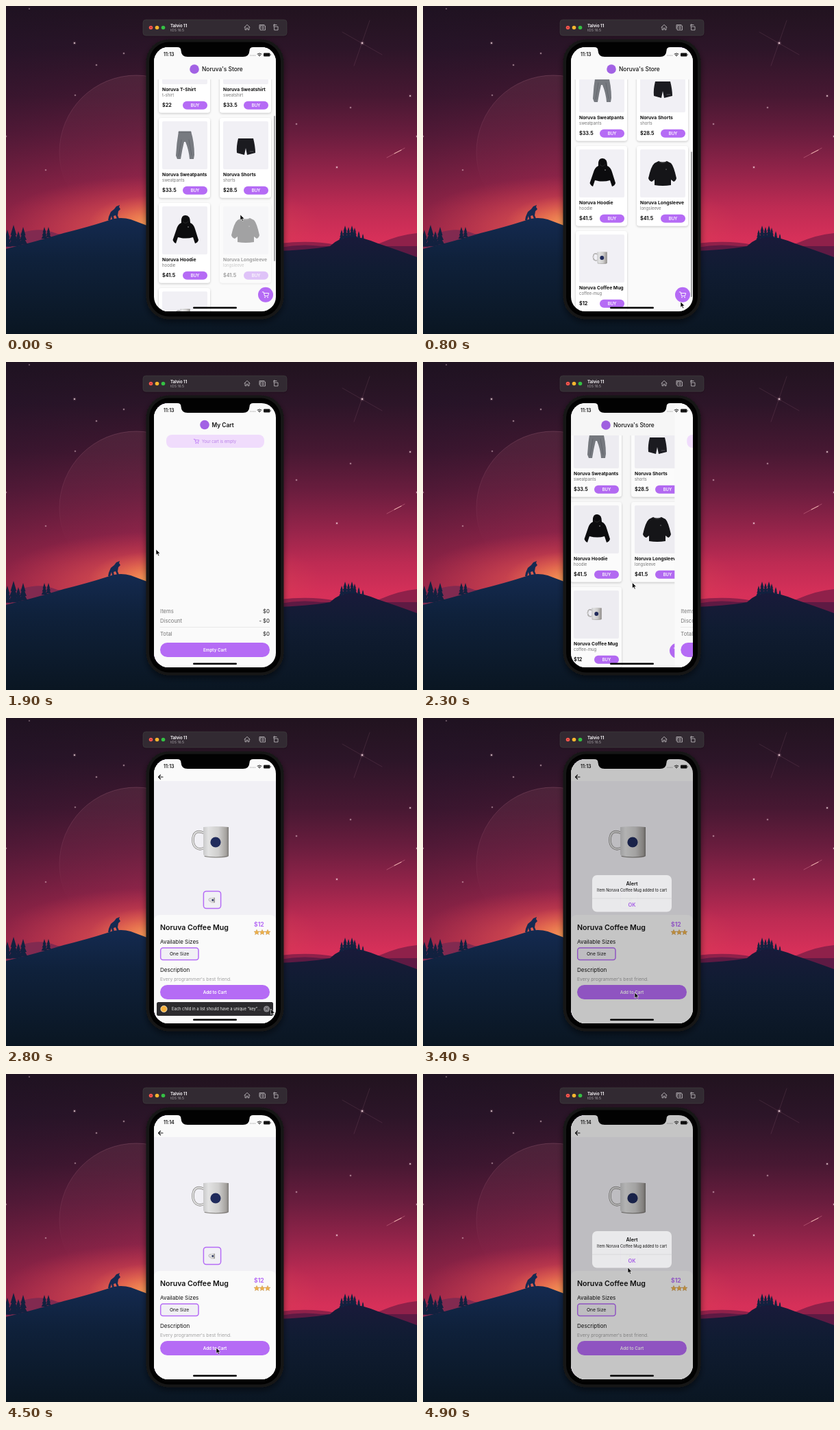
Recreate the animation shown at these times as an HTML page. Size 600 px wide and 478 px high, loop 5000 ms.

```html
<!DOCTYPE html>
<html lang="en">
<head>
<meta charset="utf-8">
<title>Store demo</title>
<style>
html, body { margin: 0; width: 100%; height: 100%; overflow: hidden; background: #0b1622; }
svg { display: block; width: 100vw; height: 100vh; font-family: Inter, sans-serif; }
</style>
</head>
<body>
<svg id="stage" viewBox="0 0 600 478"></svg>
<script>
const PURPLE = '#b56bf5', BRAND = 'Noruva', W = 178;

// ---- markup helpers ----
const text = (x, y, size, str, fill = '#111', weight = 400, anchor = 'start') =>
  `<text x="${x}" y="${y}" font-size="${size}" fill="${fill}" font-weight="${weight}" text-anchor="${anchor}">${str}</text>`;
const rect = (x, y, w, h, r, fill, more = '') =>
  `<rect x="${x}" y="${y}" width="${w}" height="${h}" rx="${r}" fill="${fill}" ${more}/>`;
const dot = (x, y, r, fill, more = '') => `<circle cx="${x}" cy="${y}" r="${r}" fill="${fill}" ${more}/>`;
const path = (d, fill, more = '') => `<path d="${d}" fill="${fill}" ${more}/>`;
const line = (d, color, width = 1, more = '') =>
  path(d, 'none', `stroke="${color}" stroke-width="${width}" stroke-linecap="round" stroke-linejoin="round" ${more}`);
const group = (id, body, more = '') => `<g id="${id}" ${more}>${body}</g>`;
const at = (x, y, body, scale = 1) => `<g transform="translate(${x} ${y}) scale(${scale})">${body}</g>`;
const stopList = stops => stops.map(([o, c, a = 1]) => `<stop offset="${o}" stop-color="${c}" stop-opacity="${a}"/>`).join('');
const gradient = (id, stops, more = 'x2="0" y2="1"') => `<linearGradient id="${id}" ${more}>${stopList(stops)}</linearGradient>`;
const radial = (id, stops) => `<radialGradient id="${id}">${stopList(stops)}</radialGradient>`;
const button = (y, label) => rect(225, y, 160, 21, 10.5, PURPLE) + text(305, y + 12.8, 6.3, label, '#fff', 600, 'middle');

// ---- scenery ----
const fir = (x, y, h) => {
  const w = h * .22;
  return path([0, .25, .5].map(k =>
    `M${x} ${y - h * (1 - k)}l${w * (.6 + k)} ${h * .45}h${-2 * w * (.6 + k)}z`).join(''), '#12213f');
};
const star = (x, y, r = .8) => dot(x, y, r * 2.2, '#f6c6d8', 'opacity=".15"') + dot(x, y, r, '#f8dfe4', 'opacity=".85"');

const defs = `<defs>
${gradient('sky', [[0, '#21131f'], [.16, '#2c1528'], [.35, '#471832'], [.5, '#6a1d3e'], [.65, '#95244a'], [.78, '#bd2b53'], [.9, '#d63059'], [1, '#d8325a']], 'x2="0" y2="375" gradientUnits="userSpaceOnUse"')}
${gradient('dark', [[0, '#1a1026', .32], [1, '#1a1026', 0]], '')}
${gradient('moon', [[0, '#8a4a60', .25], [.4, '#963c5c', .14], [.8, '#963c5c', 0]])}
${gradient('rim', [[0, '#c98298', .3], [.5, '#c98298', .12], [.7, '#c98298', 0]])}
${gradient('hillL', [[0, '#142a50'], [.35, '#0f213b'], [1, '#0a1622']])}
${gradient('hillR', [[0, '#191a3a'], [.35, '#101c32'], [1, '#0a1622']])}
${gradient('mugBody', [[0, '#c9c9ca'], [.2, '#e2e2e2'], [.6, '#cfcecd'], [.9, '#a5a29f'], [1, '#7d7a77']], '')}
${radial('haze', [[0, '#f0704e', .8], [.5, '#e4584f', .45], [1, '#d8404f', 0]])}
${radial('glow', [[0, '#ffb45c', .85], [.5, '#f9924e', .45], [1, '#f0704e', 0]])}
<filter id="soft" x="-30%" y="-30%" width="160%" height="160%"><feDropShadow dx="0" dy="1.2" stdDeviation="1.6" flood-opacity=".22"/></filter>
<filter id="deep" x="-30%" y="-30%" width="160%" height="160%"><feDropShadow dx="0" dy="4" stdDeviation="5" flood-opacity=".5"/></filter>
<clipPath id="screen"><rect x="216" y="60" width="${W}" height="385" rx="21"/></clipPath>
</defs>`;

const scenery = rect(0, 0, 600, 478, 0, 'url(#sky)') + rect(0, 0, 300, 375, 0, 'url(#dark)') +
  dot(190, 213, 112, 'url(#moon)', 'stroke="url(#rim)" stroke-width=".8"') +
  '<ellipse cx="225" cy="322" rx="240" ry="75" fill="url(#haze)"/><ellipse cx="215" cy="318" rx="95" ry="42" fill="url(#glow)"/>' +
  [[100, 54, 1.1], [132, 86], [172, 69], [101, 130, .7], [503, 148], [590, 131, 1], [424, 172], [483, 235, 1],
   [58, 239, .7], [34, 4, .6], [0, 190], [600, 190, 1], [520, 54, 1.3]].map(s => star(...s)).join('') +
  line('M491 38l58 33M531 21l-23 66', '#e8a0b8', .5, 'opacity=".25"') +
  line('M556 221l26 -14', '#e58aa0', .7, 'opacity=".6"') + line('M567 215l10 -5', '#ffc9c0', .9) +
  path('M0 337Q20 330 38 327T75 332L110 335V380H0z', '#812a50') +
  path('M400 346Q425 343 448 344T490 350L545 346Q575 333 600 331V390H400z', '#8f214a') +
  path('M400 352Q430 346 460 350L600 350V400H400z', '#5e1a43') +
  path('M0 354Q45 343 84 331Q120 322 148 313Q165 306 182 311L206 320L300 350V478H0z', 'url(#hillL)') +
  path('M300 350L390 357Q440 356 473 350Q486 337 505 336Q522 337 543 346Q570 355 600 366V478H300z', 'url(#hillR)') +
  [[2, 352, 26], [11, 352, 33], [18, 350, 22], [25, 349, 27], [56, 340, 18], [62, 338, 16]].map(f => fir(...f)).join('') +
  [[490, 341, 15], [495, 339, 19], [500, 338, 16], [505, 338, 18], [509, 338, 15], [515, 340, 12], [521, 341, 9]].map(f => fir(...f)).join('') +
  path('M149 312l1-5 3-7 5-4 3-4 5-2-1 3 2 3-3 3-1 6 2 5h-3l-2-5-3 1 1 5h-3l-1-5-2 6z', '#152a52');

const light = (x, c) => dot(x, 31.5, 2.8, c);
const titleBar = rect(200, 20, 210, 23, 4, '#302c30', 'filter="url(#soft)" stroke="#464046" stroke-width=".5"') +
  light(211.5, '#f4564e') + light(220.5, '#f6b62f') + light(229.5, '#35c144') +
  dot(211.5, 31.5, .7, '#8d1d18') +
  text(240, 30.7, 6, 'Talvio 11', '#f4f1f4', 700) + text(240, 37.3, 5.2, 'tOS 16.5', '#aaa5aa') +
  line('M348 31l4-3.7 4 3.7M349 30.5v4.2h2v-2.5h2v2.5h2v-4.2', '#c5c0c5', .8) +
  line('M370 33v-5.5h7M371.5 29h7v6h-7z', '#c5c0c5', .8) + dot(375, 32, 1.4, 'none', 'stroke="#c5c0c5" stroke-width=".7"') +
  line('M392 30h5v5h-5zM391 30v-2.5h4M392 26.5l-1.3 1 1.3 1', '#c5c0c5', .8);

const phone = rect(204.5, 48.5, 201, 408, 33, '#191819', 'filter="url(#deep)"') +
  rect(209, 52.5, 192, 400, 29, '#020202');

// ---- app parts ----
const cartIcon = (x, y, c, s = 1) => at(x, y,
  line('M-5-4h2l1.6 6h5l1.3-4.3h-7', c, 1) + dot(-1, 4, .9, c) + dot(3.2, 4, .9, c), s);
const handle = 'M18 10C6 4 1 10 1 20S8 36 18 31';
const mug = line(handle, '#7f7c7a', 3.6) + line(handle, '#dcdcdc', 2.4) +
  path('M16 1Q34-1 53 1V43Q51 46 34 46T18 43Q16 42 16 40z', 'url(#mugBody)') +
  line('M18 43.5Q34 46.5 51 43.5', '#6d6966', .8) + dot(34, 23, 7.6, '#202b5c');

const art = {
  sweatpants: path('M29 19.5H47Q52 36 52 54l-1 6h-6Q44 47 39 35h-2Q34 47 32 60h-5l-2-5Q26 36 29 19.5z', '#777a80') +
    line('M29 21H47M33 32l-4 24M44 32l4 23', '#5c5f66', .7),
  shorts: path('M27 30h22Q52 42 52 51l-12 3-2-10-2 10-11-3Q24 42 27 30z', '#1b1b20') + line('M44 49h5', '#77777c', .6),
  hoodie: path('M33 29Q32 18 39 18T46 29Q51 31 53 38L58 54Q57 58 53 59L50 50Q40 53 28 50L25 59Q22 58 20.5 54L26 38Q28 31 33 29z', '#0c0c0e') +
    line('M35 27Q39 32 43 27', '#333', .7) + dot(43, 35, .7, '#ccc'),
  longsleeve: path('M32 22Q38 25 44 22L50 25Q54 29 58 47Q57 51 54 52L50 49V57Q38 59 26 57V49L22 52Q18 51 17 47Q21 29 26 25z', '#151518') +
    line('M32.5 23Q38 27 43.5 23', '#444', .7) + dot(43, 34, .6, '#ccc'),
  'coffee-mug': at(25, 30, mug, .39)
};
const card = (name, kind, price, i) => at(223 + i % 2 * 89, 39 + (i >> 1) * 124, group('card' + i,
  rect(0, 0, 75, 116.5, 4, '#fff', 'filter="url(#soft)"') + rect(5, 5, 66, 70, 2, '#f1f0f5') + (art[kind] || '') +
  text(5, 85, 6.8, `${BRAND} ${name}`, '#111', 700) + text(5, 93, 6, kind, '#777') +
  text(5, 108.2, 7.2, price, '#111', 700) +
  rect(35, 99.8, 36, 12, 6, PURPLE) + text(53, 108.2, 6, 'BUY', '#fff', 600, 'middle')));
const logo = (x, y) => dot(x, y, 6.8, '#a262e4');
const page = (id, body) => group(id, rect(216, 60, W, 385, 0, '#fafafa') + body);

const shop = page('shop',
  group('list', [['T-Shirt', 't-shirt', '$22'], ['Sweatshirt', 'sweatshirt', '$33.5'], ['Sweatpants', 'sweatpants', '$33.5'],
    ['Shorts', 'shorts', '$28.5'], ['Hoodie', 'hoodie', '$41.5'], ['Longsleeve', 'longsleeve', '$41.5'],
    ['Coffee Mug', 'coffee-mug', '$12']].map((c, i) => card(...c, i)).join('')) +
  group('bar', rect(391, 160, 2, 212, 1, '#a2a2a4')) +
  rect(216, 60, W, 47, 0, '#fafafa') + logo(275, 92) + text(286, 95.3, 8.4, BRAND + "'s Store", '#111', 500) +
  dot(379, 420.7, 11, PURPLE) + cartIcon(379, 420.7, '#fff', .95));

const sum = (y, label, value) => text(225, y, 7.7, label, '#777') + text(385, y, 7.7, value, '#333', 500, 'end');
const cart = page('cart',
  logo(290, 91.5) + text(300.5, 94.6, 8.4, 'My Cart', '#111', 600) +
  rect(234, 106, 143, 19, 8, '#f0dcfc') + cartIcon(278, 115.5, PURPLE, .75) + text(286, 117.7, 5.8, 'Your cart is empty', '#b87fe8') +
  sum(366, 'Items', '$0') + sum(380, 'Discount', '- $0') + line('M225 386.5H385', '#ddd', .6) + sum(398.5, 'Total', '$0') +
  button(409, 'Empty Cart'));

const rating = [366, 374, 382].map(x => at(x, 312.3,
  path('M0-4L1.2-1.4 4-1.2 1.9.7 2.5 3.5 0 2-2.5 3.5-1.9.7-4-1.2-1.2-1.4z', '#eeb14a', 'stroke="#b98a4c" stroke-width=".4"'))).join('');
const toast = group('toast', rect(220, 414, 170, 20, 2.5, '#2c2b2e') + dot(230.5, 424, 4.6, '#f5b03c', 'stroke="#fff3d6" stroke-width=".8"') +
  line('M238.5 417v14', '#3d3c40', .5) +
  text(242, 426, 5.8, 'Each child in a list should have a unique "key"...', '#eee') +
  dot(380.5, 424, 4.6, '#87868a') + line('M378.8 422.3l3.4 3.4m0-3.4l-3.4 3.4', '#2c2b2e', .8));
const product = page('product',
  rect(216, 92, W, 205, 0, '#f1f0f5') + line('M229 86h-6.5m3-3l-3 3 3 3', '#111', 1.1) +
  at(272, 158, mug) + rect(288.4, 252.4, 25.2, 25.2, 4, '#f1f0f5', `stroke="${PURPLE}" stroke-width="1.5"`) + at(296, 261.5, mug, .17) +
  rect(216, 287, W, 158, 8, '#fafafa') +
  text(225, 309.3, 10.6, BRAND + ' Coffee Mug', '#111', 600) + text(362, 304.3, 8.6, '$12', PURPLE, 700) + rating +
  text(225, 328.5, 8, 'Available Sizes') +
  rect(225.7, 335, 55.3, 17.5, 3.5, '#f1f0f5', `stroke="${PURPLE}" stroke-width="1.5"`) + text(253, 346.3, 6.7, 'One Size', '#111', 400, 'middle') +
  text(225, 370.3, 8, 'Description') + text(225, 382.7, 6.8, "Every programmer's best friend.", '#a2a2a2') +
  button(389, 'Add to Cart') + toast);

const status = text(230, 73.2, 7, '<tspan id="clock"></tspan>', '#111', 600) +
  path('M250 60H361Q355.5 60 355.5 65Q355 74 346 74H265Q256 74 255.5 65Q255.5 60 250 60z', '#020202') +
  [357, 359.2, 361.4, 363.6].map(x => dot(x, 72, .6, '#777')).join('') +
  line('M367 70Q370 67.5 373 70M368.3 71.5Q370 70 371.7 71.5', '#111', .9) + dot(370, 72.8, .7, '#111') +
  rect(376, 68.5, 9.5, 5, 1.3, '#111') + rect(386, 70, .9, 2, .4, '#777');

const alertBox = group('alert', rect(216, 60, W, 385, 0, '#000', 'opacity=".21"') + group('box',
  rect(247, 229, 116, 53.5, 7, '#ececed', 'opacity=".96"') + text(305, 244.2, 7.2, 'Alert', '#111', 600, 'middle') +
  text(305, 253, 5.6, `Item ${BRAND} Coffee Mug added to cart`, '#111', 400, 'middle') +
  line('M247 263H363', '#cfced1', .6) + text(305, 275.3, 7.4, 'OK', '#a55be6', 600, 'middle')));

const cursor = group('cursor', path('M0 0V8.2L1.9 6.5 3.3 9.6 4.7 9 3.3 6H6z', '#050505', 'stroke="#fff" stroke-width=".6"'));

const stage = document.getElementById('stage');
stage.innerHTML = defs + scenery + titleBar + phone +
  group('app', shop + group('shade', rect(216, 60, W, 385, 0, '#000')) + cart + product + status + alertBox +
    rect(273, 438.6, 64, 2.4, 1.2, '#050505'), 'clip-path="url(#screen)"') + cursor;

// ---- motion ----
const el = id => document.getElementById(id);
const smooth = u => u * u * (3 - 2 * u);
const easeOut = u => 1 - (1 - u) ** 3;
// keys: [time, value...]; returns the eased values at t
function track(t, keys, ease = smooth) {
  const i = keys.findIndex(k => k[0] > t);
  if (i < 1) return (i ? keys[keys.length - 1] : keys[0]).slice(1);
  const a = keys[i - 1], b = keys[i], u = ease((t - a[0]) / (b[0] - a[0]));
  return a.slice(1).map((v, j) => v + (b[j + 1] - v) * u);
}
const move = (id, x, y) => el(id).setAttribute('transform', `translate(${x} ${y})`);
const fade = (id, a) => el(id).setAttribute('opacity', a);

const POINTER = [[0, 342, 304], [200, 343, 262], [300, 344, 262], [800, 376, 431], [1100, 376, 428], [1800, 219, 273],
  [1950, 219, 273], [2200, 345, 277], [2400, 266, 366], [2500, 266, 366], [2800, 386.5, 424], [2900, 386, 424],
  [3200, 309, 400], [3400, 309, 400], [3700, 305, 271], [3800, 305, 271], [4100, 308, 371], [4400, 307, 399],
  [4600, 307, 399], [4900, 299, 282]];
const CART = [[1000, 0], [1400, 1], [1950, 1], [2200, .3], [2400, 0]];
const PRODUCT = [[2400, 0], [2700, 1]];
const ALERT = [[3200, 0], [3400, 1], [3700, 1], [3900, 0], [4500, 0], [4700, 1]];

function draw(t) {
  const [scroll] = track(t, [[0, 0], [600, 83]], easeOut);
  const [inCart] = track(t, CART), [inProduct] = track(t, PRODUCT, easeOut), [alert] = track(t, ALERT);
  const pushed = Math.max(inCart, inProduct);
  move('list', 0, -scroll);
  move('bar', 0, scroll * .63);
  fade('card5', track(t, [[0, .38], [200, 1]])[0]);
  move('shop', -.3 * W * pushed, 0);
  fade('shade', .1 * pushed);
  move('cart', W * (1 - inCart), 0);
  move('product', W * (1 - inProduct), 0);
  fade('toast', t >= 2600 && t < 2900 ? 1 : 0);
  fade('alert', alert);
  const s = t > 3600 && t < 4400 ? 1 : 1.15 - .15 * alert;
  el('box').setAttribute('transform', `translate(305 255.5) scale(${s}) translate(-305 -255.5)`);
  el('clock').textContent = t < 3700 ? '11:13' : '11:14';
  move('cursor', ...track(t, POINTER));
}

const start = performance.now();
function tick() {
  const t = (performance.now() - start) % 5000;
  draw(Math.floor(t / 100) * 100);
  requestAnimationFrame(tick);
}
tick();
</script>
</body>
</html>
```
